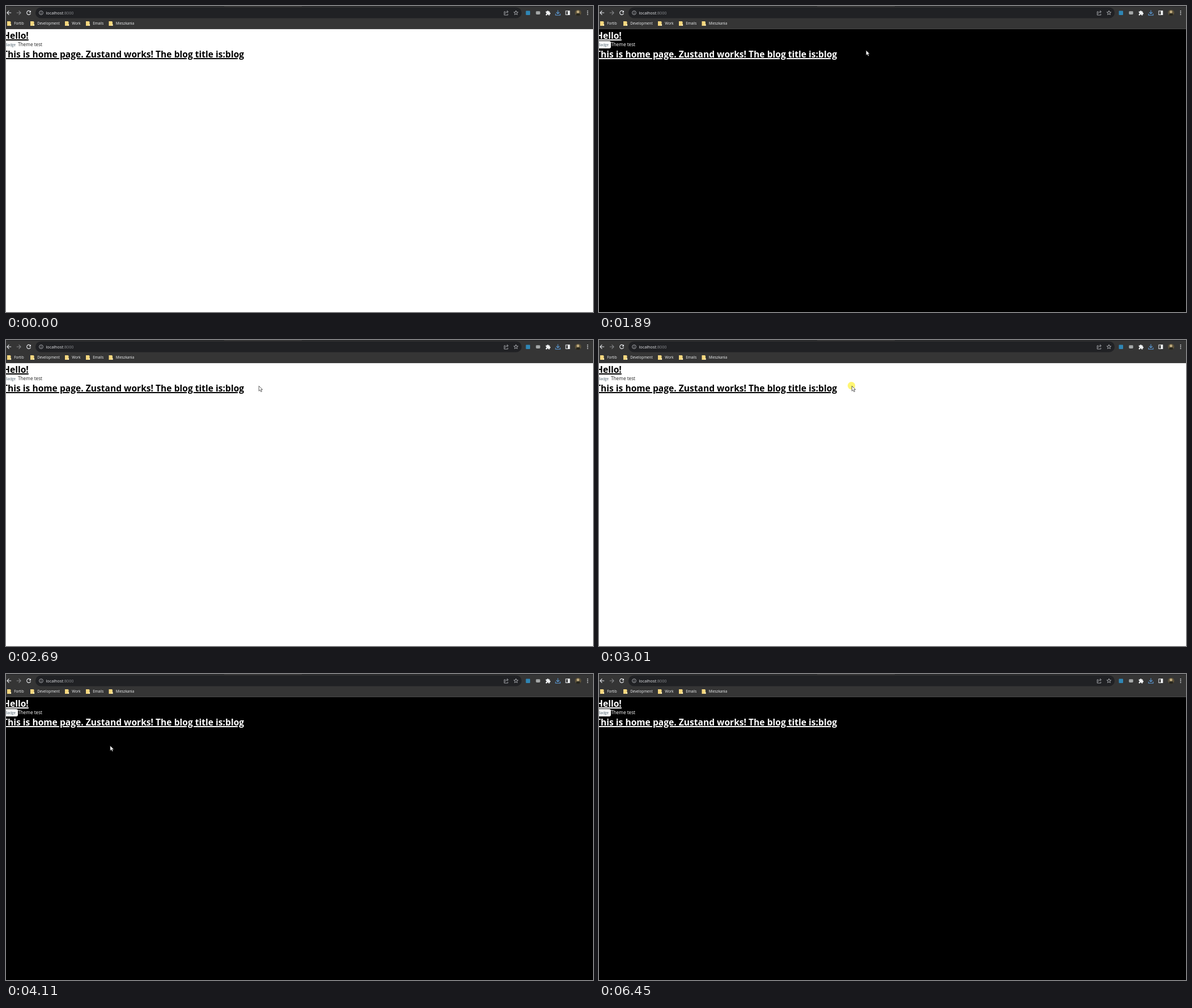
An HTML page that plays this animation: 1036 by 541 pixels, repeating every 7050 ms.

```html
<!DOCTYPE html>
<html lang="en">
<head>
<meta charset="utf-8">
<title>Theme toggle</title>
<style>
  html, body { margin: 0; width: 100%; height: 100%; overflow: hidden; }
  body { position: relative; font-family: "Open Sans", "Noto Sans", sans-serif; }
  #page { position: absolute; inset: 41px 0 0; background: #fff; color: #000; }
  #page.dark { background: #000; color: #fff; }
  #page > * { position: absolute; margin: 0; white-space: pre; }
  h1 {
    font-size: 15.6px; line-height: 20px; font-weight: 700;
    text-decoration: underline; text-decoration-thickness: 1.6px; text-underline-offset: 1.4px;
  }
  #hello { left: -5px; top: 1px; }
  #title { left: -6px; top: 34px; }
  #badge {
    left: -5px; top: 21px; width: 22.2px; height: 13px; padding-left: 3.8px; border-radius: 3px;
    background: #fff; color: #4b5f6c; font-size: 6.2px; line-height: 13px;
  }
  #test { left: 21px; top: 21px; font-size: 8.24px; line-height: 12px; color: #222; }
  .dark #test { color: #fff; }
  svg { position: absolute; left: 0; top: 0; }
  .line { fill: none; stroke: #e8eaed; stroke-width: 1.1; }
  .dim { stroke: #85878a; }
  .thin { stroke: #b0b3b7; stroke-width: .9; }
  .label { font-size: 6.3px; fill: #f1f3f4; }
  .url { font-size: 7.27px; fill: #e8eaed; }
</style>
</head>
<body>
<div id="page">
  <h1 id="hello">Hello!</h1>
  <div id="badge">Badge</div>
  <div id="test">Theme test</div>
  <h1 id="title">This is home page. Zustand works! The blog title is:blog</h1>
</div>

<svg width="1036" height="541" viewBox="0 0 1036 541">
  <rect width="1036" height="41" fill="#353535"/>
  <rect width="1036" height="1" fill="#202124"/>
  <rect x="385" width="137" height="1" fill="#353535"/>
  <rect y="40" width="1036" height="1" fill="#484848"/>
  <rect x="52" y="2.5" width="858" height="19" rx="9.5" fill="#202124"/>

  <path class="line" d="M9.2 12H2M5.4 8.4 1.9 12l3.5 3.6"/>
  <path class="line dim" d="M18.8 12H26M22.6 8.4 26.1 12l-3.5 3.6"/>
  <path class="line" d="M43 9.8A3.5 3.5 0 1 0 43.5 13"/>
  <path d="M44 8v3.6h-3.6z" fill="#e8eaed"/>

  <circle class="line thin" cx="62" cy="12" r="3.4"/>
  <path class="line thin" d="M62 11.6v2.3M62 9.9v.9"/>
  <text class="url" x="70.5" y="14.6">localhost<tspan fill="#888b8f">:8000</tspan></text>

  <path class="line thin" d="M881.5 10h-2.2v6h6.4v-2.2M881 13.8c.3-2.6 2-3.6 4.8-3.6M884 8l2.4 2.2-2.4 2.2"/>
  <path class="line thin" id="star"/>

  <rect x="917.5" y="8.5" width="7.5" height="7.5" rx="1" fill="#2f86b5"/>
  <rect x="935.3" y="9.3" width="7.4" height="5.6" rx="1.4" fill="#a5a8a8"/>
  <path d="M952.7 9.6h2.1a1.4 1.4 0 0 1 2.8 0h2v2.2a1.4 1.4 0 0 1 0 2.8v1.8h-2.2a1.3 1.3 0 0 0-2.6 0h-2.1v-2.1a1.3 1.3 0 0 0 0-2.6z" fill="#f1f3f4"/>
  <path class="line" d="M974 7.5v6M971.2 10.8l2.8 2.8 2.8-2.8M970 13.5v2.8h8v-2.8" style="stroke:#5b9bd8"/>
  <path class="line" d="M988 8.7h6.8v6.8H988z"/>
  <path d="M991.5 8.5h3.4v7.2h-3.4z" fill="#f1f3f4"/>

  <clipPath id="face"><circle cx="1009.7" cy="12" r="5.6"/></clipPath>
  <g clip-path="url(#face)">
    <rect x="1003" y="5" width="14" height="14" fill="#5b513a"/>
    <circle cx="1009.5" cy="10.5" r="2.4" fill="#c2ad80"/>
    <circle cx="1009.8" cy="17" r="4" fill="#28271f"/>
  </g>
  <path d="M1026.5 8.9v6.3" fill="none" stroke="#e8eaed" stroke-width="1.8" stroke-linecap="round" stroke-dasharray="0 3.1"/>

  <g id="marks"></g>

  <g id="pointer">
    <circle id="halo" cx="-.5" cy="-.3" r="6.7" fill="#ffee00" fill-opacity=".55"/>
    <path d="M.3.3v8.9l2.1-1.9 1.5 3.3 1.6-.7-1.5-3.2h2.8z" fill="#fff" stroke="#222" stroke-width=".7"/>
  </g>
</svg>

<script>
  const LOOP = 7050;
  const $ = id => document.getElementById(id);
  const page = $('page'), pointer = $('pointer'), halo = $('halo');

  const bookmarks = { Fortib: 2, Development: 43, Work: 104, Emails: 141, Mieszkania: 181.5 };
  $('marks').innerHTML = Object.entries(bookmarks).map(([name, x]) =>
    `<path d="M${x} 27h5.5l1 1.2v6.8h-6.5z" fill="#f6d77e"/>
     <path d="M${x + 5.2} 32.2h1.9v2.8h-1.9z" fill="#fff0bd"/>
     <text class="label" x="${x + 12.2}" y="33.1">${name}</text>`).join('');

  const starPoint = (_, i) => {
    const r = i % 2 ? 1.7 : 4, a = i * Math.PI / 5;
    return [900 + r * Math.sin(a), 12.2 - r * Math.cos(a)];
  };
  $('star').setAttribute('d', `M${Array.from({ length: 10 }, starPoint).join('L')}Z`);

  // Each leg eases the pointer to a new place
  const origin = { x: 690, y: 357 };
  const legs = [
    { from: 100, to: 700, x: 50, y: 89 },
    { from: 700, to: 1100, x: 191, y: 119 },
    { from: 1100, to: 1600, x: 471, y: 78 },
    { from: 1890, to: 2090, x: 446, y: 81 },
    { from: 3200, to: 3810, x: 43, y: 12 },
    { from: 3910, to: 4510, x: 296, y: 218 },
    { from: 4710, to: 5330, x: 39, y: 12 },
    { from: 5430, to: 6030, x: 920, y: 465 },
    { from: 6030, to: 6230, x: 1027, y: 534 }
  ];
  const shown = [[100, 6030], [6230, 6450]];

  // The theme flips at the end of each toggle click
  const toggles = [[1790, 1890], [2590, 2690], [3010, 3200]];
  const clicks = [...toggles, [1100, 1200], [3910, 4010], [5330, 5430]];

  const within = (spans, t) => spans.some(([a, b]) => t >= a && t < b);
  const easeOut = k => 1 - (1 - k) ** 2;

  // Progress advances in even steps of about 100 ms
  function progress({ from, to }, t) {
    const steps = Math.round((to - from) / 100);
    const k = Math.min(1, Math.max(0, (t - from) / (to - from)));
    return easeOut(Math.floor(k * steps) / steps);
  }

  function place(t) {
    let { x, y } = origin;
    for (const leg of legs) {
      const k = progress(leg, t);
      x += (leg.x - x) * k;
      y += (leg.y - y) * k;
    }
    return [x, y];
  }

  function draw(t) {
    const flips = toggles.filter(([, end]) => t >= end).length;
    page.classList.toggle('dark', flips % 2 === 1);
    pointer.setAttribute('display', within(shown, t) ? 'inline' : 'none');
    pointer.setAttribute('transform', `translate(${place(t)})`);
    halo.setAttribute('display', within(clicks, t) ? 'inline' : 'none');
  }

  const start = performance.now();
  function tick() {
    draw((performance.now() - start) % LOOP);
    requestAnimationFrame(tick);
  }
  tick();
</script>
</body>
</html>
```
